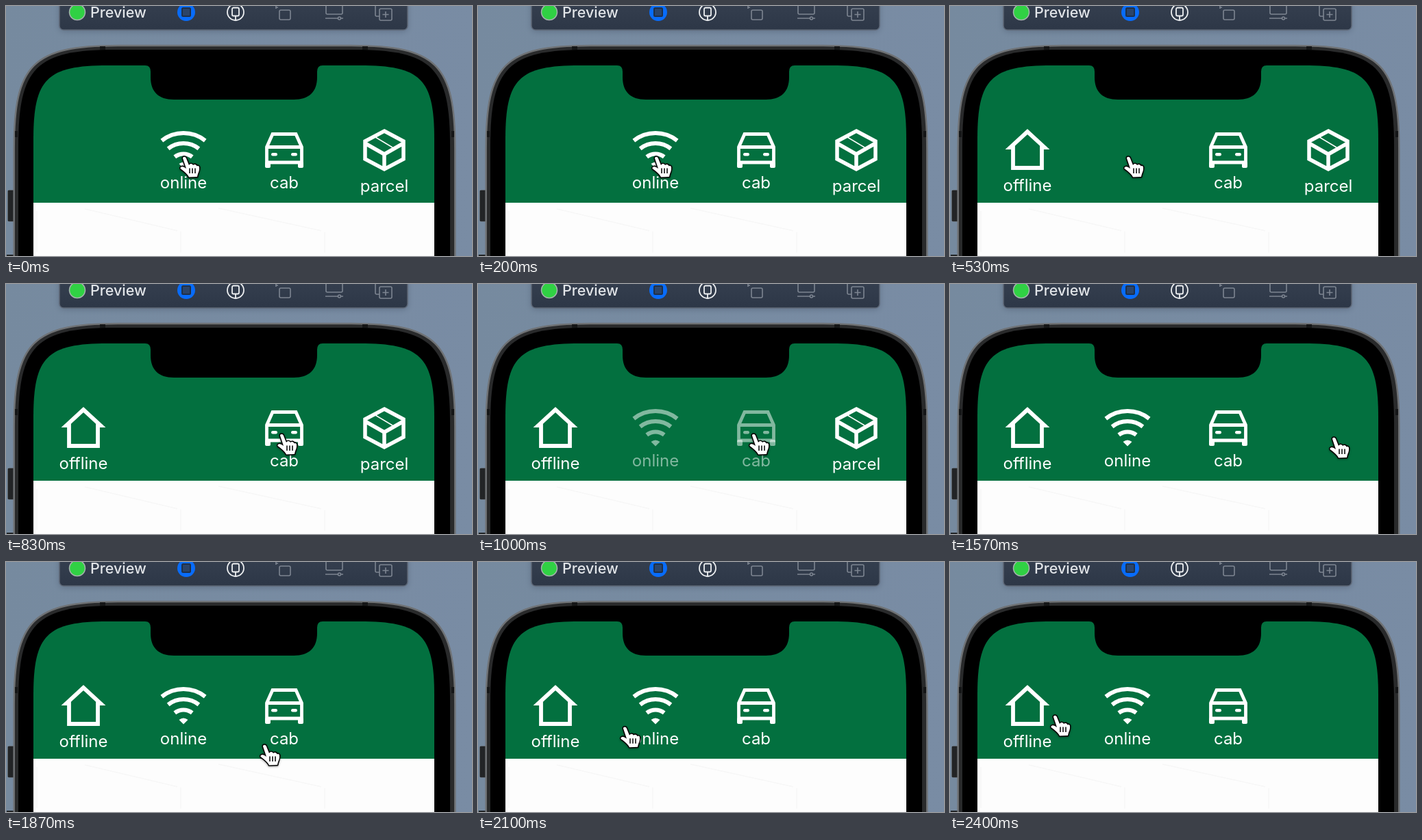
Write an HTML page with a canvas that moves like this. It is 680 by 366 pixels and loops after 2.43 s.

```html
<!DOCTYPE html>
<html lang="en">
<head>
<meta charset="utf-8">
<title>Tab selection</title>
<style>
html, body { margin: 0; width: 100%; height: 100%; overflow: hidden; background: #768a9f; }
canvas { display: block; }
</style>
</head>
<body>
<canvas id="stage" width="680" height="366"></canvas>
<script>
const ctx = document.getElementById('stage').getContext('2d');
const LOOP = 2430;
const GREEN = '#03703f';

// Cursor keys: time, x, y of the fingertip
const cursorKeys = [
  [0, 260, 222], [560, 260, 222], [800, 402, 221], [1090, 402, 221],
  [1270, 478, 220], [1430, 560, 226], [1620, 560, 226],
  [1870, 377, 269], [2270, 153, 226], [LOOP, 153, 226]
];
const selections = [[0, 'offline'], [260, 'online'], [940, 'cab'], [1430, 'parcel']];
const FADE = 120;

const handPath = new Path2D(
  'M-2 1C-2-2 2-2 3 1L7 11C9 8 12 9 13 11C15 9 18 10 18.5 12.5' +
  'C20 11 22.5 12.5 22 15C22.5 20 20 22 19 28L7 28.5C5 24 0 20-5 16.5C-7 14-3 12 0 14L3 16Z');

function fill(path, color) {
  ctx.fillStyle = color;
  ctx.fill(path);
}

function stroke(path, color, width) {
  ctx.strokeStyle = color;
  ctx.lineWidth = width;
  ctx.stroke(path);
}

function line(d, color, width) {
  stroke(new Path2D(d), color, width);
}

function rect(x, y, w, h, color) {
  ctx.fillStyle = color;
  ctx.fillRect(x, y, w, h);
}

function roundRect(x, y, w, h, r) {
  const path = new Path2D();
  path.roundRect(x, y, w, h, r);
  return path;
}

function disc(x, y, r) {
  const path = new Path2D();
  path.arc(x, y, r, 0, Math.PI * 2);
  return path;
}

function text(label, x, y, font, color, align) {
  ctx.font = font;
  ctx.textAlign = align;
  ctx.fillStyle = color;
  ctx.fillText(label, x, y);
}

// Phone outline with continuous-curvature top corners, open below the stage
function shell(left, top, right, radius) {
  const r = radius * 1.528, c = r * 0.18;
  const path = new Path2D();
  path.moveTo(left, 400);
  path.lineTo(left, top + r);
  path.bezierCurveTo(left, top + c, left + c, top, left + r, top);
  path.lineTo(right - r, top);
  path.bezierCurveTo(right - c, top, right, top + c, right, top + r);
  path.lineTo(right, 400);
  path.closePath();
  return path;
}

function drawToolbar() {
  const bar = roundRect(78, -20, 508, 55, 6);
  ctx.save();
  ctx.shadowColor = 'rgba(20,30,50,.25)';
  ctx.shadowBlur = 10;
  ctx.shadowOffsetY = 2;
  const shade = ctx.createLinearGradient(0, 0, 0, 35);
  shade.addColorStop(0, '#343e4e');
  shade.addColorStop(1, '#2d3747');
  fill(bar, shade);
  ctx.restore();
  stroke(bar, '#5d6776', 1.5);

  fill(disc(104, 9, 11.5), '#30d144');
  stroke(disc(104, 9, 11.5), '#a5b3ad', 1.5);
  text('Preview', 123, 17, '500 21.5px Inter, sans-serif', '#e2e5e9', 'left');

  fill(disc(263, 9, 13), '#086cfa');
  fill(roundRect(257, 3, 12, 12, 1.5), '#2c4468');
  stroke(roundRect(257, 3, 12, 12, 1.5), '#1f3048', 2);

  stroke(disc(335, 9, 12), '#eef0f2', 1.8);
  stroke(roundRect(330, 2.5, 10, 12, 2), '#eef0f2', 1.8);
  line('M335 14.5V21', '#eef0f2', 1.8);

  const dim = '#7d8591';
  stroke(roundRect(399, 6, 16, 14, 2), dim, 1.6);
  line('M394 4V-2M394 2H397', dim, 1.6);
  stroke(roundRect(467, -8, 24, 20, 2), dim, 1.6);
  line('M466 18H484M489 18H492', dim, 1.6);
  stroke(disc(486.5, 18, 2), dim, 1.6);
  stroke(roundRect(545, 4, 18, 17, 2), dim, 1.6);
  line('M545 15H541Q539 15 539 13V-2M554 8V17M549.5 12.5H558.5', dim, 1.6);
}

function drawPhone() {
  stroke(roundRect(3, 270, 14, 45, 2), '#55585c', 1.5);
  rect(3, 270, 10, 45, '#222426');
  rect(1, 364, 11, 2, '#222426');

  const body = shell(11.7, 58, 655.3, 99);
  fill(body, '#292a2b');
  stroke(body, '#6f7275', 2.5);
  for (const x of [137, 520]) rect(x, 59, 8, 5, '#151617');
  for (const x of [13, 650]) rect(x, 183, 4, 9, '#151617');
  fill(shell(18, 64, 648, 93), '#000');

  ctx.save();
  ctx.clip(shell(40, 87, 625, 71));
  rect(40, 87, 585, 201, GREEN);
  rect(40, 288, 585, 78, '#fdfdfd');
  line('M45 300V360M115 297L250 329M255 330V361M310 296L460 329M465 331V361', '#f7f7f7', 1.5);
  ctx.restore();

  fill(new Path2D('M203 86V87Q211 87 211 96V104C211 126 223 137 245 137' +
    'H420C442 137 454 126 454 104V96Q454 87 462 87V86Z'), '#000');
}

const icons = {
  offline() {
    line('M113 184L88 207H92V237H134V207H138Z', '#fff', 5.8);
  },
  online() {
    for (const r of [51, 36, 20.5]) {
      const arc = new Path2D();
      arc.arc(259, 237, r, -Math.PI / 2 - 0.67, -Math.PI / 2 + 0.67);
      stroke(arc, '#fff', 6);
    }
    fill(new Path2D('M252.5 231Q259 226 265.5 231L259 237.5Z'), '#fff');
  },
  cab() {
    line('M380.5 206.5L389 187.5H423L431.5 206.5V229H380.5ZM380.5 206.5H431.5', '#fff', 4.8);
    fill(roundRect(378, 228, 8, 9, 2), '#fff');
    fill(roundRect(426, 228, 8, 9, 2), '#fff');
    fill(roundRect(387, 215, 9, 4.5, 2.2), '#fff');
    fill(roundRect(416, 215, 9, 4.5, 2.2), '#fff');
  },
  parcel() {
    line('M552 183L580 198V224L552 239L524 224V198ZM524 201L552 217L580 201M552 217V239', '#fff', 5.5);
    line('M539 192L564 207', '#fff', 1.5);
  }
};
const labels = { offline: [113, 271], online: [259, 267], cab: [406, 267], parcel: [552, 272] };

function visibility(name, t) {
  let selected = name === selections[0][1] ? 1 : 0;
  for (const [start, choice] of selections.slice(1)) {
    const p = Math.min(1, Math.max(0, (t - start) / FADE));
    selected += ((choice === name ? 1 : 0) - selected) * p;
  }
  return 1 - selected;
}

function drawTabs(t) {
  for (const name in icons) {
    ctx.globalAlpha = visibility(name, t);
    icons[name]();
    text(name, ...labels[name], '400 24px Inter, sans-serif', '#fff', 'center');
  }
  ctx.globalAlpha = 1;
}

// Slope of a cursor coordinate at key i; zero beside a rest
function slope(i, axis) {
  const a = cursorKeys[i - 1], b = cursorKeys[i], c = cursorKeys[i + 1];
  if (!a || !c || a[1] === b[1] || b[1] === c[1]) return 0;
  return (c[axis] - a[axis]) / (c[0] - a[0]);
}

function cursorAt(t, axis) {
  const i = cursorKeys.findIndex(key => key[0] > t) - 1;
  const a = cursorKeys[i], b = cursorKeys[i + 1];
  const span = b[0] - a[0], u = (t - a[0]) / span, v = 1 - u;
  return a[axis] * v * v * (1 + 2 * u) + b[axis] * u * u * (3 - 2 * u) +
    span * u * v * (slope(i, axis) * v - slope(i + 1, axis) * u);
}

function drawCursor(t) {
  ctx.save();
  ctx.translate(cursorAt(t, 1), cursorAt(t, 2));
  ctx.lineJoin = 'round';
  ctx.shadowColor = 'rgba(0,0,0,.4)';
  ctx.shadowBlur = 3;
  ctx.shadowOffsetY = 1;
  stroke(handPath, '#000', 3);
  ctx.shadowColor = 'transparent';
  fill(handPath, '#fff');
  line('M8 15.5V23M12 15.5V23M16 15.5V23', '#000', 1.5);
  ctx.restore();
}

function render(now) {
  const t = Math.max(0, now) % LOOP;
  const sky = ctx.createLinearGradient(0, 0, 680, 0);
  sky.addColorStop(0, '#768a9f');
  sky.addColorStop(1, '#798ca4');
  rect(0, 0, 680, 366, sky);
  drawPhone();
  drawToolbar();
  drawTabs(t);
  drawCursor(t);
}

let began;
function tick(now) {
  began ??= now;
  render(now - began);
  requestAnimationFrame(tick);
}
render(0);
requestAnimationFrame(tick);
</script>
</body>
</html>
```
